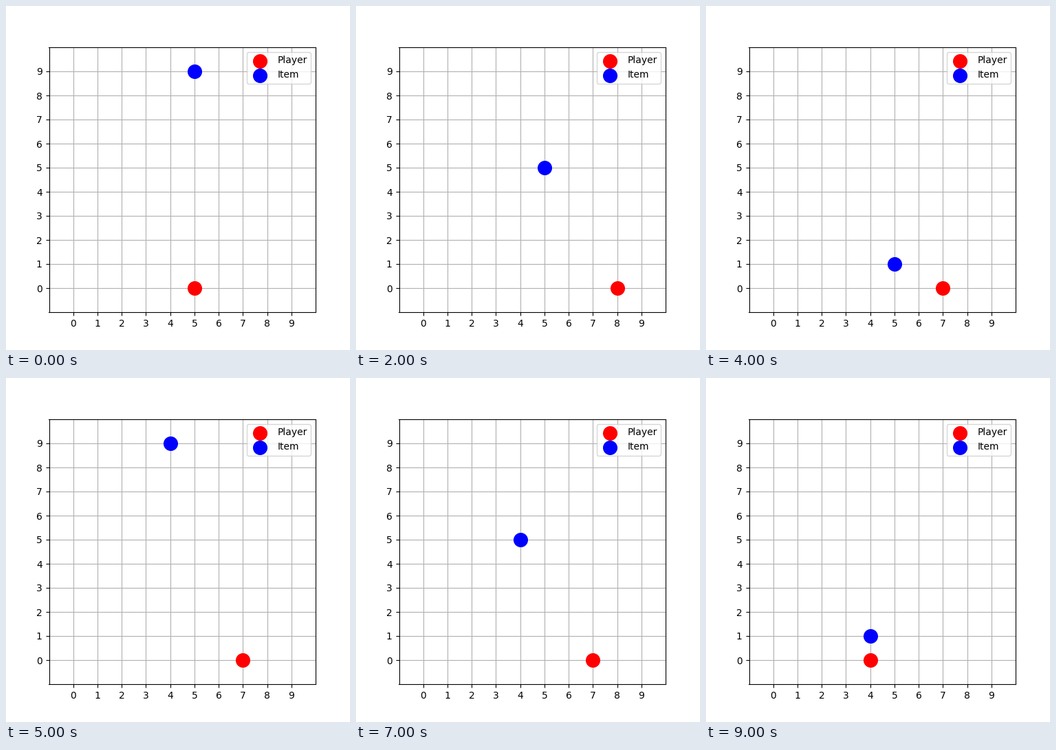
Write a matplotlib script that moves like this. It is 500 px wide and 500 px high and loops after 9.5 s.

```python
import matplotlib.pyplot as plt
from matplotlib.animation import FuncAnimation

SIZE = 10
FRAMES = 19
STEP_MS = 500

START_X = 5
MOVES = [0, 1, 1, 0, 1, -1, 1, -1, 0, 0, 0, 1, -1, 1, -1, 0, -1, -1, -1]

fig, ax = plt.subplots(figsize=(5, 5), dpi=100)
ax.set_xlim(-1, SIZE)
ax.set_ylim(-1, SIZE)
ax.set_xticks(range(SIZE))
ax.set_yticks(range(SIZE))
ax.grid(True)

player = ax.scatter([], [], s=200, c="red", label="Player", zorder=2)
item = ax.scatter([], [], s=200, c="blue", label="Item", zorder=2)
ax.legend(loc="upper right")


def update(i):
    drop, fallen = divmod(i, SIZE)
    player.set_offsets([(START_X + sum(MOVES[:i + 1]), 0)])
    item.set_offsets([(START_X - drop, SIZE - 1 - fallen)])
    return player, item


anim = FuncAnimation(fig, update, frames=FRAMES, interval=STEP_MS,
                     repeat=True, repeat_delay=0)
plt.show()
```
